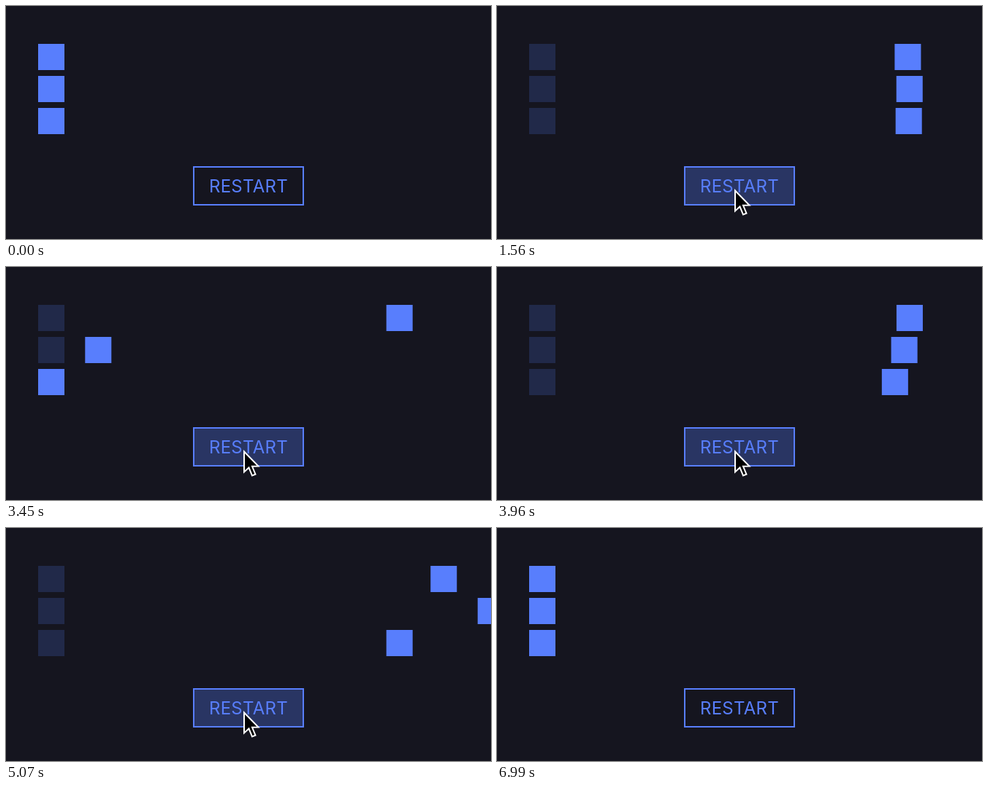
An HTML page with a canvas that plays this animation: 664 px wide and 320 px high, repeating every 7.02 s.

```html
<!DOCTYPE html>
<html>
<head>
<meta charset="utf-8">
<style>
html, body { margin: 0; width: 664px; height: 320px; overflow: hidden; background: #15151f; }
canvas { display: block; }
</style>
</head>
<body>
<canvas id="stage" width="664" height="320"></canvas>
<script>
const ctx = document.getElementById('stage').getContext('2d');
const BLUE = '#587efd';
const LOOP = 7020, STEP = 30, SPEED = 10 / 9;
const LEG = 1200, HOLD = 32;             // one pass, and the short stop at each turn
const STARTS = [795, 3345, 4125, 4785];  // presses of the button
const ARROW = new Path2D('M0 0V28L6.5 22L11 33L15.5 31.2L11 20.3L19.5 20Z');

const clamp = v => Math.min(1, Math.max(0, v));
const elastic = u => u <= 0 ? 0 : u >= 1 ? 1 : 1 - 2 ** (-10 * u) * Math.cos(4 * Math.PI * u);

// Position within a pass, running forth and back since the last press
function playhead(t) {
  const start = STARTS.filter(s => s <= t).pop();
  if (start === undefined) return 0;
  const s = (t - start) * SPEED;
  const r = Math.min(s % (LEG + HOLD), LEG);
  return Math.floor(s / (LEG + HOLD)) % 2 ? LEG - r : r;
}

function cursorY(t) {
  const enter = 1 - clamp((t - 60) / 390);
  const leave = clamp((t - 5878) / 300);
  return 253.5 + 70 * (enter ** 2 + leave ** 2);
}

function square(x, row, alpha) {
  ctx.globalAlpha = alpha;
  ctx.fillRect(x, 52 + 44 * row, 36, 36);
  ctx.globalAlpha = 1;
}

function draw(t) {
  const p = playhead(t), y = cursorY(t);
  ctx.fillStyle = '#15151f';
  ctx.fillRect(0, 0, 664, 320);

  ctx.fillStyle = ctx.strokeStyle = BLUE;
  for (let i = 0; i < 3; i++) {
    square(44, i, 0.19);
    square(44 + 500 * elastic((p - 100 * i) / 1000), i, 1);
  }

  if (y < 274) {
    ctx.globalAlpha = 0.3;
    ctx.fillRect(258, 222, 148, 50);
    ctx.globalAlpha = 1;
  }
  ctx.lineWidth = 2;
  ctx.strokeRect(257, 221, 150, 52);
  ctx.font = '24px Inter, Roboto, sans-serif';
  ctx.letterSpacing = '0.3px';
  ctx.textAlign = 'center';
  ctx.fillText('RESTART', 332, 256);

  if (y < 323) {
    ctx.save();
    ctx.translate(326, y);
    ctx.fillStyle = '#000';
    ctx.strokeStyle = '#fff';
    ctx.fill(ARROW);
    ctx.stroke(ARROW);
    ctx.restore();
  }
}

const origin = performance.now();
function frame() {
  const t = (performance.now() - origin) % LOOP;
  draw(Math.floor(t / STEP) * STEP);
  requestAnimationFrame(frame);
}
frame();
</script>
</body>
</html>
```
